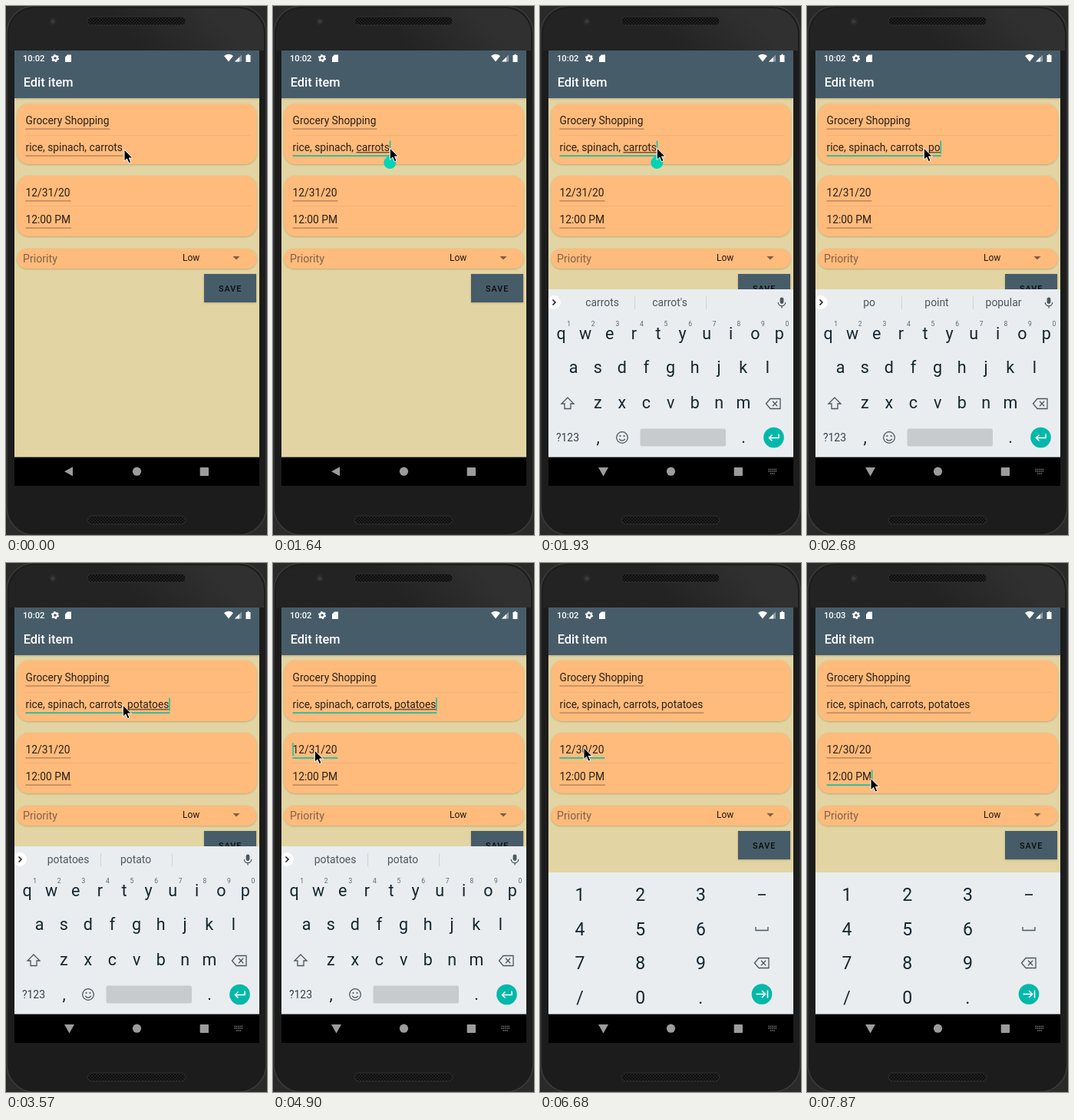
An HTML page for the animation above (8 s loop, 340x689 px).

```html
<!DOCTYPE html>
<html lang="en">
<head>
<meta charset="utf-8">
<title>Edit item</title>
<style>
  html, body { margin: 0; width: 100%; height: 100%; overflow: hidden; background: #1c1c1c; }
  svg { display: block; width: 100%; height: 100%; }
  text { font-family: Roboto, "Open Sans", sans-serif; white-space: pre; }
  .field { font-size: 13.8px; fill: #2a2018; }
  .medium { font-weight: 500; }
  .mid { text-anchor: middle; }
  .key { font-size: 21.5px; fill: #14262e; }
  .digit { font-size: 23px; fill: #14262e; }
  .hint { font-size: 8.5px; fill: #5b666c; }
  .word { font-size: 13.9px; fill: #4a575e; }
  .line { fill: none; stroke: #4a575e; stroke-width: 1.3; }
</style>
</head>
<body>
<svg id="stage" viewBox="0 0 340 689">
  <defs>
    <clipPath id="screen"><rect x="11" y="58" width="319" height="567"/></clipPath>
    <pattern id="mesh" width="4" height="4" patternUnits="userSpaceOnUse">
      <rect width="4" height="4" fill="#0d0d0d"/>
      <path d="M0 0L4 4M4 0L0 4" stroke="#262626" stroke-width=".8"/>
    </pattern>
    <linearGradient id="gloss" gradientUnits="userSpaceOnUse" x1="185" y1="70" x2="265" y2="0">
      <stop offset="0" stop-color="#fff" stop-opacity=".03"/>
      <stop offset="1" stop-color="#fff" stop-opacity=".09"/>
    </linearGradient>
    <filter id="soft" x="-10%" y="-20%" width="120%" height="150%">
      <feDropShadow dx="0" dy=".8" stdDeviation=".8" flood-color="#5a4520" flood-opacity=".35"/>
    </filter>
    <g id="erase">
      <path class="line" d="M-9.5 0L-4-6.5H9V6.5H-4ZM-1-3.2L5.2 3.2M5.2-3.2L-1 3.2"/>
    </g>
  </defs>

  <rect width="340" height="689" fill="#2a2a2a"/>
  <rect x="1" y="0" width="338" height="689" rx="36" fill="#1d1d1d" stroke="#3b3b3b" stroke-width="1.5"/>
  <rect x="4" y="3" width="332" height="683" rx="33" fill="#1c1c1c"/>
  <path d="M4 58V36A33 33 0 0 1 37 3H303A33 33 0 0 1 336 36V58Z" fill="url(#gloss)"/>
  <circle cx="61" cy="20" r="5" fill="#292929"/>
  <circle cx="61" cy="20" r="2.6" fill="#3b3b3b"/>
  <rect x="106" y="14" width="128" height="11" rx="5.5" fill="url(#mesh)" stroke="#303030"/>
  <rect x="106" y="664" width="128" height="11" rx="5.5" fill="url(#mesh)" stroke="#303030"/>

  <g clip-path="url(#screen)">
    <rect x="11" y="58" width="319" height="567" fill="#e2d5a3"/>
    <rect x="11" y="58" width="319" height="62" fill="#475c69" filter="url(#soft)"/>
    <text id="clock" class="medium" x="22" y="72" font-size="11.2" fill="#fff"></text>
    <g fill="#fff">
      <circle cx="64" cy="68" r="2.9" fill="none" stroke="#fff" stroke-width="2.2"/>
      <circle cx="64" cy="68" r="4.4" fill="none" stroke="#fff" stroke-width="1.4" stroke-dasharray="2.3 2.3"/>
      <path d="M80 63.5H85V73H77V66.5Z"/>
      <path d="M284 65Q290 60.5 296 65L290 72.5Z"/>
      <path d="M298 72.5L307 63.5V72.5Z" opacity=".4"/>
      <path d="M298 72.5L304 66.5V72.5Z"/>
      <path d="M312.5 64H314.5V62.7H316.5V64H318.5V73H312.5Z"/>
    </g>
    <text class="medium" x="22.7" y="104.5" font-size="16.4" fill="#fff">Edit item</text>

    <g fill="#ffbb7b" filter="url(#soft)">
      <rect x="14.5" y="127" width="312" height="79" rx="15"/>
      <rect x="14.5" y="221" width="312" height="79" rx="15"/>
      <rect x="14.5" y="316" width="312" height="26" rx="13"/>
    </g>
    <path d="M25 168.5H319M25 260.5H319" stroke="#eeb27a"/>
    <g id="fields"></g>
    <text x="22" y="333.5" font-size="14.2" fill="#80634a">Priority</text>
    <text x="230" y="332" font-size="12" fill="#1f1812">Low</text>
    <path d="M295.5 326H304.5L300 330.5Z" fill="#7d5f43"/>
    <rect x="258" y="349" width="68" height="37" fill="#475c69" filter="url(#soft)"/>
    <text class="medium" x="277" y="372" font-size="10.8" letter-spacing="1" fill="#0b0d0e">SAVE</text>

    <g id="letters">
      <rect x="11" y="369" width="319" height="219" fill="#e9edf0"/>
      <circle cx="18" cy="386" r="9" fill="#fff"/>
      <path d="M16.5 382.5L20 386L16.5 389.5" fill="none" stroke="#222" stroke-width="1.6"/>
      <path d="M123.5 378V395M216.5 378V395" stroke="#ccd2d6"/>
      <g id="words"></g>
      <rect x="312.6" y="379.5" width="4.8" height="8.5" rx="2.4" fill="#4a575e"/>
      <path class="line" d="M310.3 386A4.7 4.7 0 0 0 319.7 386M315 390.7V393.5"/>
      <g id="letterKeys"></g>
      <path class="line" d="M36 510L44 518H40V524.5H32V518H28Z"/>
      <use href="#erase" x="304" y="518"/>
      <text class="mid" x="36" y="567" font-size="14" fill="#34434b">?123</text>
      <circle class="line" cx="107" cy="562" r="7.3"/>
      <path class="line" d="M103.2 564Q107 568.4 110.800 564"/>
      <circle cx="104.5" cy="560" r="1.1" fill="#4a575e"/>
      <circle cx="109.5" cy="560" r="1.1" fill="#4a575e"/>
      <rect x="130.5" y="550.5" width="111.5" height="23" rx="2.5" fill="#c8cbce"/>
      <circle cx="304.5" cy="562" r="13.3" fill="#00b8a9"/>
      <path d="M311 557.5V562.5H298.5M302.5 558.5L298.5 562.5L302.5 566.5" fill="none" stroke="#fff" stroke-width="1.6"/>
    </g>

    <g id="numbers">
      <rect x="11" y="403" width="319" height="185" fill="#e9edf0"/>
      <g id="numberKeys"></g>
      <path d="M284 432H294" stroke="#14262e" stroke-width="1.7"/>
      <path class="line" d="M281 474V478.5H297V474"/>
      <use href="#erase" x="289" y="521"/>
      <circle cx="289" cy="561.5" r="13.3" fill="#00b8a9"/>
      <path d="M281.5 561.5H293M289 557L293.5 561.5L289 566M296.5 556.5V566.5" fill="none" stroke="#fff" stroke-width="1.6"/>
    </g>

    <rect x="11" y="587.6" width="319" height="38" fill="#000"/>
    <g fill="#9c9c9c">
      <path id="back" d="M76 606.3L87 600.3V612.3Z"/>
      <path id="hide" d="M76 601H89L82.5 612.5Z"/>
      <circle cx="170.5" cy="606.2" r="5.6"/>
      <rect x="252.7" y="601" width="11.3" height="11" rx=".8"/>
    </g>
    <path id="board" d="M297.5 603.5H309M297.5 606H309M300 609H306.5" stroke="#858585" stroke-width="1.3" stroke-dasharray="1.3 1"/>
    <path id="handle" d="M0 0L5.7 5.7A8 8 0 1 1 -5.7 5.7Z" fill="#00d3b6"/>
  </g>
  <path id="mouse" d="M0 0V15.3L3.5 12L6 17.7L8.7 16.5L6.3 11H11Z" fill="#000" stroke="#fff" stroke-linejoin="round"/>
</svg>

<script>
const LOOP = 8000, STEP = 148.5;
const TEAL = "#12bfa4", BROWN = "#9a6c49";
const $ = id => document.getElementById(id);

function add(parent, tag, attrs, text) {
  const node = document.createElementNS("http://www.w3.org/2000/svg", tag);
  set(node, attrs);
  if (text) node.textContent = text;
  parent.appendChild(node);
  return node;
}
function set(node, attrs) {
  for (const name in attrs) node.setAttribute(name, attrs[name]);
}
const show = (node, on) => set(node, { visibility: on ? "visible" : "hidden" });
const move = (node, x, y) => set(node, { transform: `translate(${x} ${y})` });

// Keyboard labels
function keyRow(parent, cls, labels, x, y, gap) {
  [...labels].forEach((ch, i) => add(parent, "text", { class: cls + " mid", x: x + i * gap, y }, ch));
}
const GAP = 31.6;
keyRow($("letterKeys"), "key", "qwertyuiop", 27.5, 433.5, GAP);
keyRow($("letterKeys"), "hint", "1234567890", 37.6, 417, GAP);
keyRow($("letterKeys"), "key", "asdfghjkl", 43.6, 478, GAP);
keyRow($("letterKeys"), "key", "zxcvbnm", 75.3, 524, GAP);
keyRow($("letterKeys"), "key", ",", 75.5, 569, 0);
keyRow($("letterKeys"), "key", ".", 265, 569, 0);
["123", "456", "789", "/0."].forEach((row, i) =>
  keyRow($("numberKeys"), "digit", row, 52, 439.7 + i * 44.8, 78.7));
const words = [81, 169, 256].map(x => add($("words"), "text", { class: "word mid", x, y: 391 }));

// Text fields with an underline, a composing mark and a caret
function makeField(y) {
  const g = $("fields");
  return {
    y,
    text: add(g, "text", { class: "field", x: 25.5, y }),
    rule: add(g, "rect", { x: 25.5 }),
    mark: add(g, "rect", { y: y + 1.3, height: 1, fill: "#2a2018" }),
    caret: add(g, "rect", { y: y - 13.5, width: 1.5, height: 17, fill: TEAL })
  };
}
const [title, list, date, hour] = [154, 189, 247.8, 283].map(makeField);

function drawField(f, value, { focus = false, caret = -1, composing = false } = {}) {
  if (f.text.textContent !== value) f.text.textContent = value;
  const widthTo = n => n > 0 ? f.text.getSubStringLength(0, n) : 0;
  const full = widthTo(value.length);
  set(f.rule, {
    y: f.y + (focus ? 5.3 : 5.6), width: full + 1,
    height: focus ? 1.7 : 1, fill: focus ? TEAL : BROWN
  });
  const word = composing && /\w+$/.exec(value);
  show(f.mark, word);
  if (word) {
    const from = widthTo(word.index);
    set(f.mark, { x: 25.5 + from, width: full - from });
  }
  show(f.caret, caret >= 0);
  set(f.caret, { x: 25.3 + widthTo(caret) });
}

// Hard changes: [time, value...]
const typed = [
  [0, ""], [2230, ","], [2380, ", "], [2530, ", p"], [2680, ", po"], [2820, ", pot"],
  [2970, ", potat"], [3120, ", potato"], [3570, ", potatoes"]
];
const offers = [
  [0, "carrots", "carrot's", ""], [2230, "and", "the", "I"], [2530, "p", "please", "pm"],
  [2680, "po", "point", "popular"], [2820, "pot", "potato", "potatoes"],
  [2970, "potat", "potato", "potatoes"], [3120, "potato", "potatoes", "Potato"],
  [3570, "potatoes", "potato", ""]
];
const dates = [[0, "12/31/20"], [6380, "12/3/20"], [6530, "12/30/20"]];
const dateCaret = [[0, -1], [4750, 0], [5340, -1], [6380, 4], [6530, 5], [6680, -1]];
const handles = [
  [0, null], [1350, 152.3, 192.7], [2230, null], [5340, 54.7, 250.5], [5930, 62, 250.5], [6380, null]
];
const slide = [[0, 219], [1790, 80], [1930, 0]];
const at = (track, t) => track.filter(k => k[0] <= t).pop().slice(1);

// Pointer path, eased between points
const path = [
  [0, 154, 187], [150, 154, 186], [900, 154, 186], [1200, 152.3, 185], [3570, 152.3, 185],
  [4600, 54.3, 244], [4900, 54.3, 244], [5200, 57, 240.5], [6820, 57, 240.5], [7120, 89.5, 283],
  [7270, 89.5, 283], [7720, 83, 280.5], [LOOP, 83, 280.5]
];
function pointer(t) {
  const i = Math.max(1, path.findIndex(p => p[0] > t));
  const [a, b] = [path[i - 1], path[i]];
  const u = Math.min(1, (t - a[0]) / (b[0] - a[0]));
  const e = u * u * (3 - 2 * u);
  return [a[1] + (b[1] - a[1]) * e, a[2] + (b[2] - a[2]) * e];
}

function draw(t) {
  const sampled = Math.floor((t + 12) / STEP) * STEP + 6;
  move($("mouse"), ...pointer(sampled));
  $("clock").textContent = t < 7420 ? "10:02" : "10:03";

  const listText = "rice, spinach, carrots" + at(typed, t)[0];
  const onList = t >= 1050 && t < 5050;
  drawField(title, "Grocery Shopping");
  drawField(list, listText, {
    focus: onList, caret: onList ? listText.length : -1, composing: onList && t >= 1350
  });
  drawField(date, at(dates, t)[0], { focus: t >= 4750 && t < 7570, caret: at(dateCaret, t)[0] });
  drawField(hour, "12:00 PM", { focus: t >= 7570, caret: t >= 7570 ? 8 : -1 });

  const [hx, hy] = at(handles, t);
  show($("handle"), hx);
  if (hx) move($("handle"), hx, hy);

  const keys = t >= 1790, numeric = t >= 5200;
  show($("letters"), keys && !numeric);
  show($("numbers"), numeric);
  move($("letters"), 0, at(slide, t)[0]);
  at(offers, t).forEach((w, i) => { words[i].textContent = w; });
  show($("back"), !keys);
  show($("hide"), keys);
  show($("board"), keys);
}

const start = performance.now();
function frame() {
  draw((performance.now() - start) % LOOP);
  requestAnimationFrame(frame);
}
frame();
</script>
</body>
</html>
```
